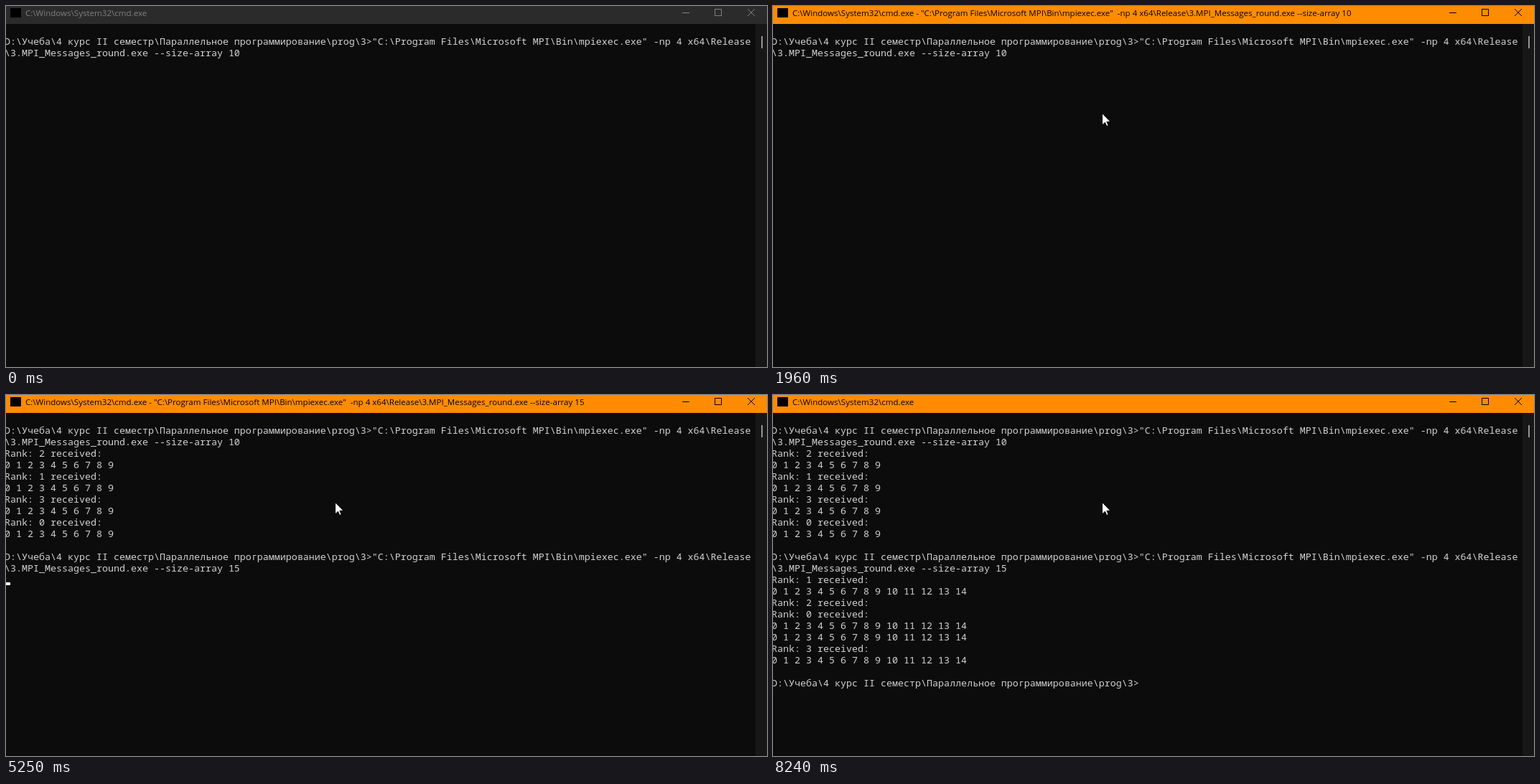
These frames come from a looping animation (1060x503 px, 8310 ms). An HTML page with a canvas:

```html
<!DOCTYPE html>
<html lang="ru">
<head>
<meta charset="utf-8">
<title>cmd.exe</title>
<style>
html, body { margin: 0; width: 100%; height: 100%; overflow: hidden; background: #0c0c0c; }
canvas { display: block; }
</style>
</head>
<body>
<canvas id="stage" width="1060" height="503"></canvas>
<script>
const ctx = document.getElementById('stage').getContext('2d', { alpha: false });
const LOOP = 8310, BLINK = 535;
const COL = 8, ROW = 16, LEFT = -2, TOP = 41;

const PROMPT = 'D:\\Учеба\\4 курс II семестр\\Параллельное программирование\\prog\\3>';
const MPIEXEC = '"C:\\Program Files\\Microsoft MPI\\Bin\\mpiexec.exe"';
const COMMAND = PROMPT + MPIEXEC + ' -np 4 x64\\Release';
const ARGS = '\\3.MPI_Messages_round.exe --size-array 1';
const CMD = 'C:\\Windows\\System32\\cmd.exe';

const CLICK = { at: 910, end: 1020 };
const RUN1 = { at: 1760, end: 2020, digit: 0 };
const RUN2 = { at: 5250, end: 5510, digit: 5 };
const RECALL = 3120, ERASE = 3850, TYPE = 4780;

const count = n => Array.from({ length: n }, (_, i) => i).join(' ');
const rank = n => `Rank: ${n} received:`;
const FIRST = [2, 1, 3, 0].flatMap(n => [rank(n), count(10)]);
const SECOND = [rank(1), count(15), rank(2), rank(0), count(15), count(15), rank(3), count(15)];

const during = (t, span) => t >= span.at && t < span.end;

function rect(color, x, y, w, h) {
  ctx.fillStyle = color;
  ctx.fillRect(x, y, w, h);
}

function drawTitle(t) {
  const active = t >= CLICK.at;
  const ink = active ? '#000' : '#808080';
  rect(active ? '#ff8c00' : '#2b2b2b', 0, 0, 1060, 25);
  rect('#000', 6, 3, 15, 13);

  const run = [RUN1, RUN2].find(r => during(t, r));
  const text = run ? `${CMD} - ${MPIEXEC}  -np 4 x64\\Release${ARGS}${run.digit}` : CMD;
  ctx.font = '11.56px "Open Sans", "Noto Sans", sans-serif';
  ctx.fillStyle = ink;
  ctx.fillText(text, 27, 14);

  rect(ink, 942, 9, 10, 1);
  ctx.strokeStyle = ink;
  ctx.lineWidth = 1;
  ctx.strokeRect(987.5, 4.5, 9, 9);
  ctx.beginPath();
  ctx.moveTo(1033, 4);
  ctx.lineTo(1043, 14);
  ctx.moveTo(1043, 4);
  ctx.lineTo(1033, 14);
  ctx.stroke();
}

function consoleLines(t) {
  const lines = [COMMAND, ARGS + RUN1.digit];
  if (t < RUN1.at) return lines;
  if (t < RUN1.end) return [...lines, ''];
  lines.push(...FIRST, '');
  if (t < RECALL) return [...lines, PROMPT];
  const digit = t < ERASE ? RUN1.digit : t < TYPE ? '' : RUN2.digit;
  lines.push(COMMAND, ARGS + digit);
  if (t < RUN2.at) return lines;
  if (t < RUN2.end) return [...lines, ''];
  return [...lines, ...SECOND, '', PROMPT];
}

// Each pair: the caret is shown, then starts blinking with its hidden half.
const CARET = [
  [1420, 1960], [RUN1.end, 3020], [RECALL, 3530], [ERASE, 4050],
  [TYPE, 5130], [RUN2.at, 6170], [8240, 8240]
];

function caretShown(t) {
  const phase = CARET.filter(([shown]) => shown <= t).pop();
  if (!phase) return false;
  return t < phase[1] || Math.floor((t - phase[1]) / BLINK) % 2 === 1;
}

function drawConsole(t) {
  const lines = consoleLines(t);
  ctx.font = '13.3333px "Noto Sans Mono", "DejaVu Sans Mono", monospace';
  ctx.fillStyle = '#d2d2d2';
  lines.forEach((line, i) => ctx.fillText(line, LEFT, TOP + 13 + i * ROW));

  if (caretShown(t)) {
    const row = lines.length - 1;
    rect('#fff', LEFT + lines[row].length * COL, TOP + row * ROW + 12, COL, 4);
  }

  rect('#171717', 1044, 25, 16, 478);
  rect('#949494', 1052, 42, 2, 17);
}

// The pointer sweeps up and left, then settles back.
function pointerAt(t) {
  const step = Math.min(8, Math.floor((t - 130) / 71.25));
  const mix = (a, b, k) => a + (b - a) * k * k * (3 - 2 * k);
  if (step <= 5) return [mix(725, 313, step / 5), mix(408, 91, step / 5)];
  const k = (step - 5) / 3;
  return [mix(313, 458, k), mix(91, 149, k)];
}

const ARROW = new Path2D('M.5 .5V17L4.4 13.3 6.8 18.6 9.2 17.6 6.9 12.3H12Z');

function drawPointer(t) {
  if (t < 130) return;
  const [x, y] = pointerAt(t).map(Math.round);
  ctx.save();
  ctx.translate(x, y);
  if (during(t, CLICK)) {
    ctx.fillStyle = '#807f00';
    ctx.beginPath();
    ctx.arc(0, 0, 12, 0, Math.PI * 2);
    ctx.fill();
  }
  ctx.fillStyle = '#fff';
  ctx.fill(ARROW);
  ctx.strokeStyle = '#000';
  ctx.lineWidth = 1;
  ctx.stroke(ARROW);
  ctx.restore();
}

function frame() {
  const t = performance.now() % LOOP;
  rect('#0c0c0c', 0, 0, 1060, 503);
  drawTitle(t);
  drawConsole(t);
  drawPointer(t);
  requestAnimationFrame(frame);
}
frame();
</script>
</body>
</html>
```
